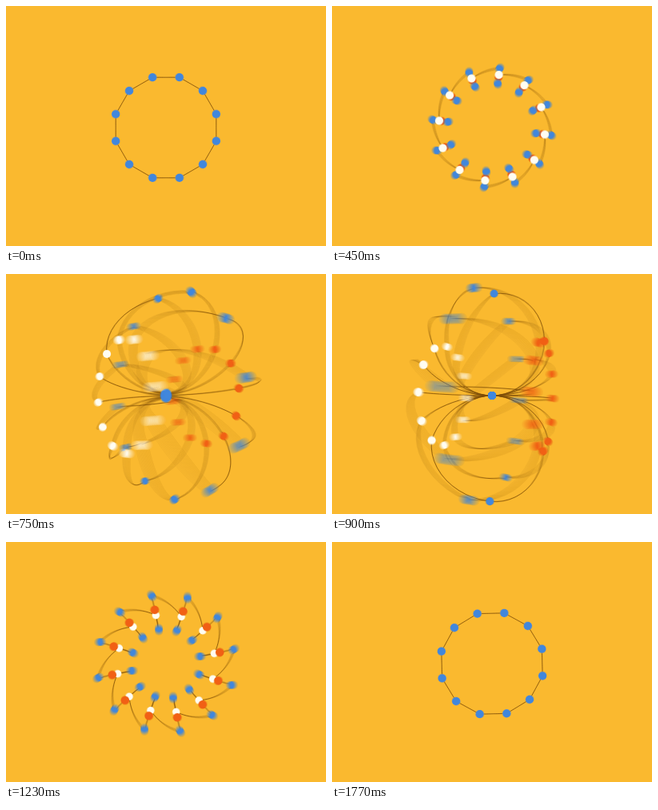
An HTML page with a canvas that plays this animation: 400 px wide and 300 px high, repeating every 1.8 s.

```html
<!DOCTYPE html>
<html>
<head>
<meta charset="utf-8">
<style>
  html, body { margin: 0; height: 100%; overflow: hidden; background: #fab92f; }
  canvas { display: block; }
</style>
</head>
<body>
<canvas id="stage" width="400" height="300"></canvas>
<script>
const LOOP = 1800, STEP = 30, SHUTTER = 26, SAMPLES = 13;
const N = 12, R = 65, VIEW = 400;
const BLUE = '#4187dc', WHITE = '#fffdf2', RED = '#f16015';
// Tube positions in quarter turns; blue comes last so it covers the closed ring.
const BEADS = [[3, RED], [1, WHITE], [0, BLUE], [2, BLUE]];

const out = document.getElementById('stage').getContext('2d');
const layer = document.createElement('canvas');
layer.width = 400;
layer.height = 300;
const ctx = layer.getContext('2d');

const clamp = v => Math.min(1, Math.max(0, v));
const ease = (t, a, b) => (1 - Math.cos(Math.PI * clamp((t - a) / (b - a)))) / 2;

// The spin reverses, slightly rounded, when the torus is seen edge-on.
function spin(t) {
  const a = 0.05 * t, b = 0.0473 * (LOOP - t);
  return (15 + (a + b - Math.hypot(a - b, 3.6)) / 2) * Math.PI / 180;
}

function pose(t) {
  const turn = Math.PI * ease(t, 484, 1213);
  const tube = R * (ease(t, 325, 825) - ease(t, 925, 1425));
  const c = Math.cos(turn), s = Math.sin(turn), phi = spin(t);

  // u counts polygon corners, q counts quarter turns around the tube.
  return (u, q) => {
    const k = Math.floor(u), f = u - k;
    const a = phi + k * 2 * Math.PI / N, b = a + 2 * Math.PI / N;
    const tau = q * Math.PI / 2;
    const d = R - tube * Math.cos(tau);
    const x = d * (Math.sin(a) * (1 - f) + Math.sin(b) * f);
    const y = -d * (Math.cos(a) * (1 - f) + Math.cos(b) * f);
    const z = tube * Math.sin(tau);
    const depth = x * s + z * c;
    const scale = VIEW / (VIEW - depth);
    return { x: 200 + (x * c - z * s) * scale, y: 152 + y * scale, depth, scale };
  };
}

function drawScene(t) {
  const at = pose(t);
  ctx.fillStyle = '#fab92f';
  ctx.fillRect(0, 0, 400, 300);

  // One strand: a full tube turn per corner, moving on between white and outer blue.
  ctx.strokeStyle = '#7c4c08';
  ctx.lineWidth = 0.8;
  ctx.lineJoin = 'round';
  ctx.beginPath();
  for (let k = 0; k < N; k++)
    for (let i = 0; i <= 48; i++) {
      const q = i / 12, p = at(k + clamp(q - 1), q);
      ctx.lineTo(p.x, p.y);
    }
  ctx.stroke();

  const dots = [];
  for (const [q, color] of BEADS)
    for (let k = 0; k < N; k++) dots.push({ ...at(k, q), color });
  dots.sort((a, b) => a.depth - b.depth);
  for (const p of dots) {
    ctx.fillStyle = p.color;
    ctx.beginPath();
    ctx.arc(p.x, p.y, 5 * p.scale, 0, 2 * Math.PI);
    ctx.fill();
  }
}

// Motion blur: a running average over the shutter time.
function render(t) {
  for (let i = 0; i < SAMPLES; i++) {
    drawScene(t + SHUTTER * (i / (SAMPLES - 1) - 0.5));
    out.globalAlpha = 1 / (i + 1);
    out.drawImage(layer, 0, 0);
  }
}

const start = performance.now();
let shown = -1;
function tick() {
  const t = Math.floor((performance.now() - start) % LOOP / STEP) * STEP;
  if (t !== shown) render(shown = t);
  requestAnimationFrame(tick);
}
tick();
</script>
</body>
</html>
```
